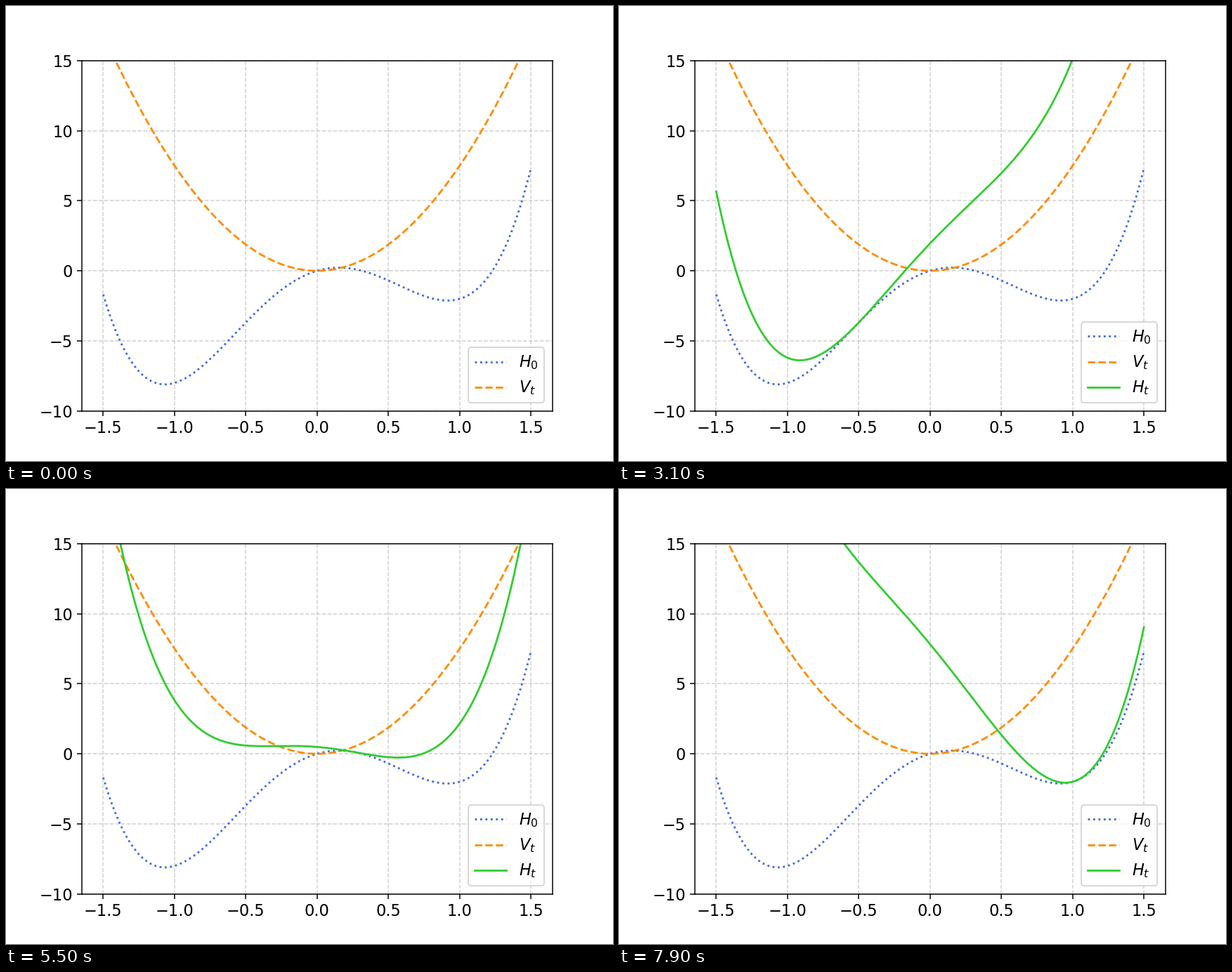
A matplotlib script that plays this animation: 864 by 648 pixels, repeating every 8000 ms.

```python
import numpy as np
import matplotlib.pyplot as plt
from matplotlib.animation import FuncAnimation

FRAMES = 80
INTERVAL = 100  # ms
STIFFNESS = 7.5

plt.rcParams.update({"font.family": "DejaVu Sans", "font.size": 12})


def well(x):
    """Tilted double-well energy."""
    return 5 * x**4 - 10 * x**2 + 3 * x


def trap(x, center=0.0):
    """Harmonic trap around a given center."""
    return STIFFNESS * (x - center) ** 2


x = np.linspace(-1.5, 1.5, 400)
centers = np.linspace(-1.5, 1.5, 95)

fig, ax = plt.subplots(figsize=(6.4, 4.8), dpi=135)
ax.grid(ls="--", alpha=0.6)
base, = ax.plot(x, well(x), ":", color="royalblue", label="$H_0$")
bias, = ax.plot(x, trap(x), "--", color="darkorange", label="$V_t$")
total, = ax.plot(x, well(x), color="limegreen", label="$H_t$")
ax.set_xlim(-1.65, 1.65)
ax.set_ylim(-10, 15)
ax.set_xticks(np.arange(-1.5, 1.6, 0.5))
ax.set_yticks(np.arange(-10, 16, 5))

short_legend = ax.legend(handles=[base, bias], loc="lower right")
ax.add_artist(short_legend)
full_legend = ax.legend(handles=[base, bias, total], loc="lower right")


def update(i):
    # The combined curve joins after the opening frame.
    started = i > 0
    total.set_visible(started)
    full_legend.set_visible(started)
    short_legend.set_visible(not started)
    total.set_ydata(well(x) + trap(x, centers[i]))
    return total, short_legend, full_legend


anim = FuncAnimation(fig, update, frames=FRAMES, init_func=lambda: update(0),
                     interval=INTERVAL, repeat=True, repeat_delay=0)
plt.show()
```
